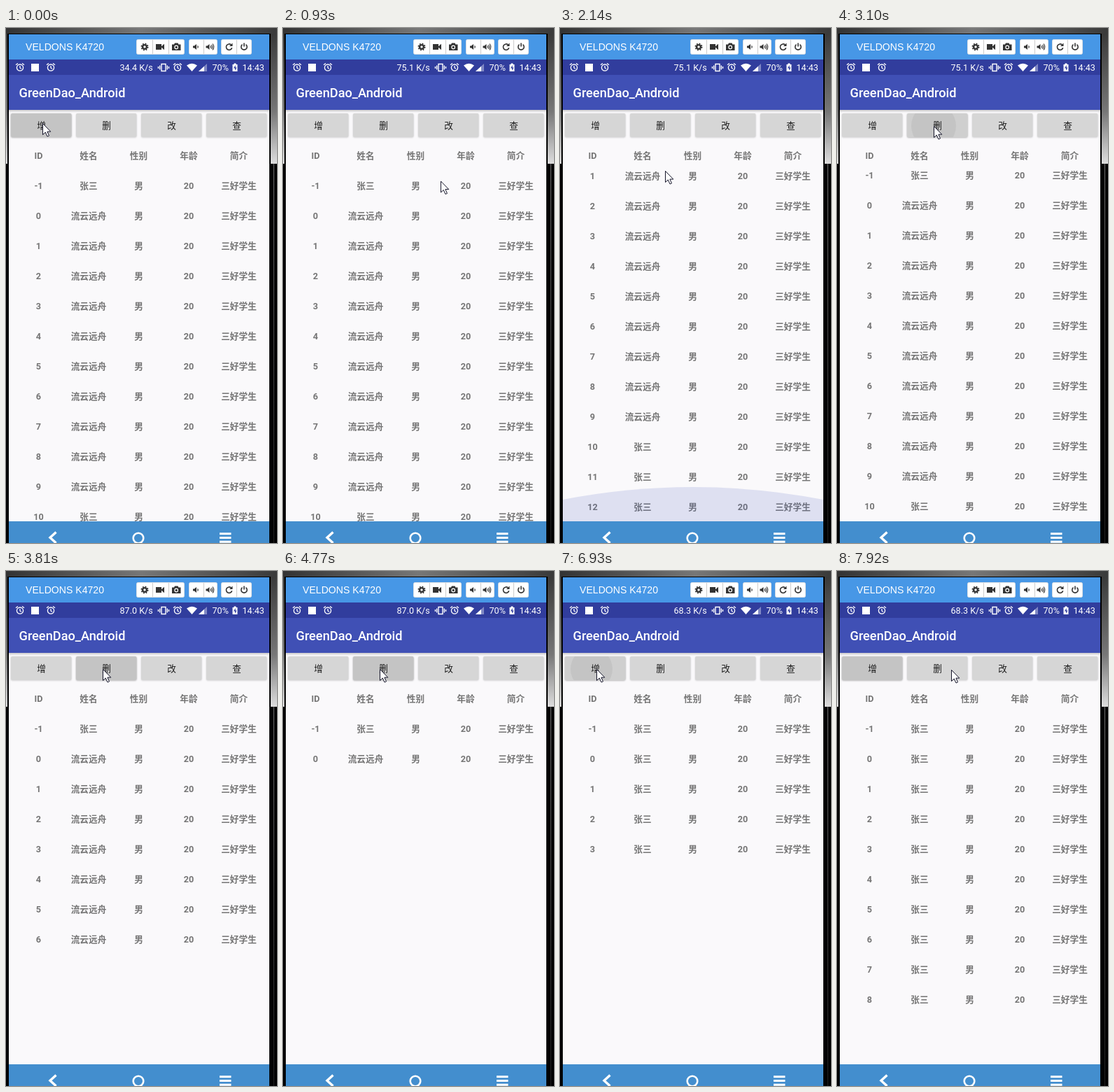
Recreate the animation shown at these times as an HTML page. Size 387x736 px, loop 8000 ms.

```html
<!DOCTYPE html>
<html lang="zh-CN">
<head>
<meta charset="utf-8">
<title>GreenDao_Android</title>
<style>
html, body { margin: 0; width: 100%; height: 100%; overflow: hidden; background: #000; }
svg { display: block; width: 387px; height: 736px; }
text { font-family: Roboto, "Noto Sans CJK SC", "Noto Sans CJK", sans-serif; font-size: 12.66px; }
.cell { font-weight: 700; fill: #757575; text-anchor: middle; }
.label { fill: #1c1c1c; text-anchor: middle; }
.status { fill: #fff; font-size: 12.6px; }
.device { font: 14.1px "Liberation Sans", Arial, sans-serif; fill: #fff; }
.title { font-size: 18.2px; font-weight: 500; fill: #fff; }
</style>
</head>
<body>
<svg viewBox="0 0 387 736" xmlns="http://www.w3.org/2000/svg">
  <defs>
    <linearGradient id="top"><stop stop-color="#333"/><stop offset=".5" stop-color="#777"/><stop offset="1" stop-color="#3a3a3a"/></linearGradient>
    <linearGradient id="side" x2="0" y2="1"><stop stop-color="#3a3a3a"/><stop offset=".6" stop-color="#777"/><stop offset="1" stop-color="#ddd"/></linearGradient>
    <linearGradient id="edge" x2="0" y2="1"><stop stop-color="#777"/><stop offset="1" stop-color="#222"/></linearGradient>
    <linearGradient id="shade" x2="0" y2="1"><stop stop-opacity=".2"/><stop offset="1" stop-opacity="0"/></linearGradient>
    <filter id="blur" x="-20%" y="-40%" width="140%" height="180%"><feGaussianBlur stdDeviation="1"/></filter>
    <clipPath id="list"><rect x="4" y="203.5" width="372" height="501.5"/></clipPath>
    <g id="alarm" fill="none" stroke="#fff" stroke-width="1.3">
      <circle r="4.6" cy=".6"/><path d="M0-2V1L2 2.3M-6-3.2L-3-5.6M6-3.2L3-5.6"/>
    </g>
  </defs>

  <!-- desktop behind the window -->
  <rect width="387" height="736"/>
  <rect width="387" height="8" fill="url(#top)"/>
  <rect y="8" width="2" height="186" fill="url(#side)"/>
  <rect x="378" y="8" width="9" height="186" fill="url(#side)"/>
  <rect x="382" y="194" width="1" height="542" fill="url(#edge)"/>

  <!-- window bar -->
  <rect x="4" y="9" width="372" height="36" fill="#4797e6"/>
  <text class="device" x="28" y="32">VELDONS K4720</text>
  <g id="tools"></g>
  <g fill="#333">
    <circle cx="198" cy="27" r="2.9" fill="none" stroke="#333" stroke-width="2.4"/>
    <circle cx="198" cy="27" r="4.7" fill="none" stroke="#333" stroke-width="1.6" stroke-dasharray="1.85 1.84"/>
    <path d="M214 23H222V26.3L226 22.8V31.2L222 27.7V31H214Z"/>
    <path d="M237 23.5H240L241 21.5H245.5L246.5 23.5H249.5V32H237Z"/>
    <circle cx="243.2" cy="27.5" r="2.3" fill="none" stroke="#fff" stroke-width="1.2"/>
    <path id="horn" d="M267 25.5H269L272 23V31L269 28.5H267Z"/>
    <use href="#horn" x="18.5"/>
    <g fill="none" stroke="#333" stroke-width="1.1">
      <path d="M273.5 25.5Q275 27 273.5 28.5M292 25.5Q293.5 27 292 28.5M293.5 24Q296 27 293.5 30M295 22.5Q298.5 27 295 31.5"/>
      <path stroke-width="1.6" d="M321.5 24A4.2 4.2 0 1 0 322.7 28.3M337.5 23.6A4.2 4.2 0 1 0 342.5 23.6M340 21.5V26.5"/>
    </g>
    <path d="M323.5 21.5V26H319Z"/>
  </g>

  <!-- status bar -->
  <rect x="4" y="45" width="372" height="22" fill="#313d9d"/>
  <use href="#alarm" x="20" y="56"/>
  <rect x="36" y="51" width="11" height="11" fill="#fff"/>
  <use href="#alarm" x="64" y="56"/>
  <text class="status" id="speed" x="162.5" y="61"></text>
  <path fill="none" stroke="#fff" stroke-width="1.4" d="M222 51.5H228V61.5H222ZM219.7 53.5V59.5M217.5 55V58M230.3 53.5V59.5M232.5 55V58"/>
  <use href="#alarm" x="245" y="56"/>
  <path d="M258 53.5Q265.5 48 273 53.5L265.5 62Z" fill="#fff"/>
  <path d="M275 62L287 51V62Z" fill="#8088c4"/><path d="M275 62L283 54.7V62Z" fill="#fff"/>
  <text class="status" x="294.5" y="61">70%</text>
  <path d="M323.5 52H325.5V50.5H328.5V52H330.5V62H323.5Z" fill="#fff"/>
  <path d="M327.7 53L325 57.5H327V61L329.5 56.5H327.7Z" fill="#313d9d"/>
  <text class="status" x="337.5" y="61">14:43</text>

  <!-- app -->
  <rect x="4" y="67" width="372" height="50" fill="#4050b5"/>
  <text class="title" x="18.5" y="98.5">GreenDao_Android</text>
  <rect x="4" y="117" width="372" height="588" fill="#faf9fb"/>
  <rect x="4" y="117" width="372" height="4" fill="url(#shade)"/>
  <g id="buttons"></g>
  <g id="head"></g>
  <g clip-path="url(#list)">
    <g id="rows"></g>
    <path id="glow" fill="#3f51b5"/>
  </g>

  <!-- navigation bar -->
  <rect x="4" y="705" width="372" height="31" fill="#438ece"/>
  <g fill="none" stroke="#fff" stroke-width="3">
    <path stroke-width="3.4" d="M71.5 720.5L63 728.3L71.5 736"/>
    <circle cx="189" cy="729" r="7.3" stroke-width="2.6"/>
    <path d="M305 722.8H321.5M305 728.5H321.5M305 734.2H321.5"/>
  </g>
  <path id="cursor" d="M.5 .5V16.5L4.3 13L7 19L9.5 17.9L6.9 12.1H11.8Z" fill="#fff" stroke="#15152a"/>
</svg>
<script>
const LOOP = 8000, PITCH = 43, VIEW = 501.5, ROWS = 14;
const $ = id => document.getElementById(id);

function add(parent, tag, attrs, text) {
  const el = document.createElementNS('http://www.w3.org/2000/svg', tag);
  set(el, attrs);
  if (text !== undefined) el.textContent = text;
  return parent.appendChild(el);
}
function set(el, attrs) {
  for (const k in attrs) el.setAttribute(k, attrs[k]);
}

const clamp = (v, lo, hi) => Math.min(hi, Math.max(lo, v));
const ramp = (t, from, to) => clamp((t - from) / (to - from), 0, 1);

// A run of evenly spaced taps, each changing one row
const removal = { start: 2890, gap: 160, count: 13 };
const insertion = { start: 6190, gap: 213, count: 9 };
const taps = (run, t) => clamp(Math.floor((t - run.start) / run.gap) + 1, 0, run.count);

// The finger goes down shortly before the row changes
const LEAD = 115;
function rippleRadius(run, t) {
  const n = taps(run, t + LEAD);
  return n ? 26 + t + LEAD - run.start - (n - 1) * run.gap : 100;
}

// Pointer moves: leave, arrive, x, y
const moves = [
  [150, 930, 225, 218], [930, 1320, 208, 400], [1320, 2140, 150, 204], [2200, 2500, 138, 140],
  [5300, 5850, 57, 135], [6000, 6100, 52, 140], [7700, 7920, 163, 141]
];
function pointer(t) {
  let x = 52, y = 136;
  for (const [from, to, toX, toY] of moves) {
    const p = ramp(t, from, to);
    x += (toX - x) * p;
    y += (toY - y) * p;
  }
  return [x, y];
}

const speedAt = t => t < 520 ? '34.4' : t < 3380 ? '75.1' : t < 6600 ? '87.0' : '68.3';

function line(parent, y, values) {
  const g = add(parent, 'g', {});
  g.cells = values.map((v, i) => add(g, 'text', { class: 'cell', x: 46.5 + 71.5 * i, y }, v));
  return g;
}

// Tool groups: x, width, number of parts
for (const [x, width, parts] of [[187, 68, 3], [262, 40, 2], [308, 43, 2]]) {
  add($('tools'), 'rect', { x: x - .5, y: 16.5, width, height: 21, rx: 2, fill: '#fff', stroke: '#d8dde3' });
  for (let i = 1; i < parts; i++)
    add($('tools'), 'path', { d: `M${Math.floor(x + width * i / parts) + .5} 17V37`, stroke: '#ccc' });
}

const buttons = [...'增删改查'].map((name, i) => {
  const g = $('buttons'), x = 7 + 93 * i;
  const box = { x, y: 122, width: 86.5, height: 34, rx: 2 };
  add(add(g, 'clipPath', { id: 'clip' + i }), 'rect', box);
  const lift = add(g, 'rect', { ...box, y: 122.8, filter: 'url(#blur)' });
  add(g, 'rect', { ...box, fill: '#d6d6d6' });
  const dim = add(g, 'rect', box);
  const layer = add(g, 'g', { 'clip-path': `url(#clip${i})` });
  const wave = add(layer, 'circle', { cx: x + 38, cy: 140 });
  add(g, 'text', { class: 'label', x: x + 43.5, y: 143.5 }, name);
  return { lift, dim, wave };
});

function paintButton({ lift, dim, wave }, level, r) {
  set(lift, { opacity: .16 + .14 * level });
  set(dim, { opacity: .03 * level });
  set(wave, { r, opacity: .05 * level });
}

line($('head'), 186.7, ['ID', '姓名', '性别', '年龄', '简介']);
const rows = Array.from({ length: ROWS }, (_, i) =>
  line($('rows'), 229.7 + PITCH * i, [i - 1, '', '男', 20, '三好学生']));

function draw(t) {
  const count = ROWS - taps(removal, t) + taps(insertion, t);
  const shift = Math.min(100 * ramp(t, 1170, 1700), Math.max(0, count * PITCH - VIEW));
  set($('rows'), { transform: `translate(0 ${-shift})` });
  rows.forEach((row, i) => {
    row.style.display = i < count ? '' : 'none';
    row.cells[1].textContent = t < 5600 && i > 0 && i < 11 ? '流云远舟' : '张三';
  });

  // Overscroll glow at the end of the list
  const glow = ramp(t, 1700, 2110) - ramp(t, 2220, 2370);
  const side = 705 - 31 * glow, peak = 705 - 67 * glow;
  set($('glow'), { d: `M4 705V${side}Q190 ${peak} 376 ${side}V705Z`, opacity: .15 * glow });

  const [insert, remove, ...idle] = buttons;
  paintButton(insert, 1 - ramp(t, 150, 500) + ramp(t, 6020, 6080), rippleRadius(insertion, t));
  paintButton(remove, ramp(t, 2460, 2500) - ramp(t, 5200, 5600), rippleRadius(removal, t));
  idle.forEach(b => paintButton(b, 0, 0));

  $('speed').textContent = speedAt(t) + ' K/s';
  set($('cursor'), { transform: `translate(${pointer(t)})` });
}

const begin = performance.now();
function tick() {
  draw((performance.now() - begin) % LOOP);
  requestAnimationFrame(tick);
}
tick();
</script>
</body>
</html>
```
